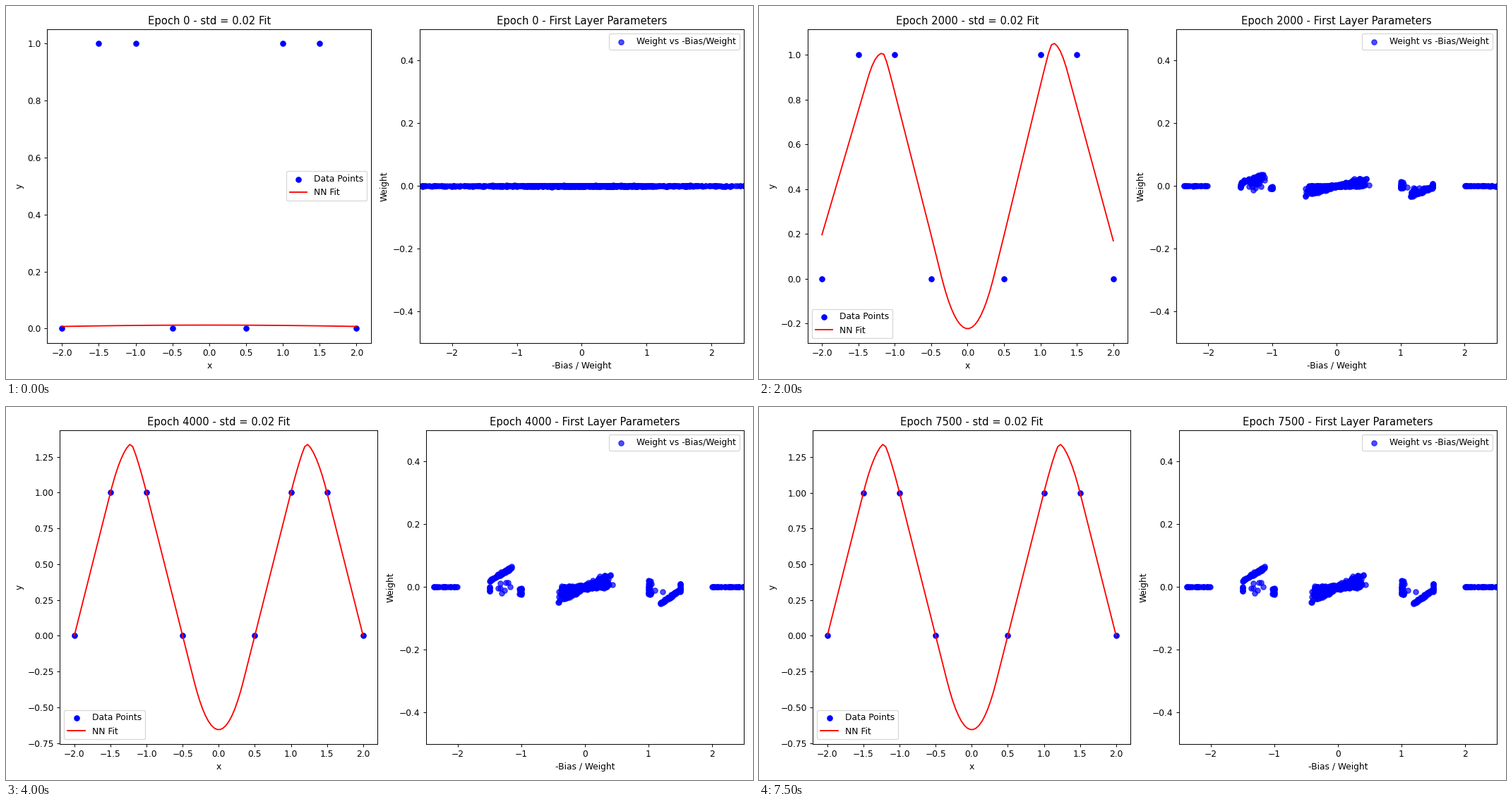
A matplotlib script for the animation above (8000 ms loop, 1058x529 px).

```python
import matplotlib.pyplot as plt
import numpy as np
from matplotlib.animation import FuncAnimation

FRAMES, INTERVAL, EPOCH_STEP = 16, 500, 500
DPI, LAYOUT_DPI = 1058 / 12, 100
NEURONS = 1000
DATA_X = np.array([-2, -1.5, -1, -0.5, 0.5, 1, 1.5, 2])
DATA_Y = ((np.abs(DATA_X) >= 1) & (np.abs(DATA_X) <= 1.5)).astype(float)
FIT_X = np.linspace(-2, 2, 100)


def lerp(a, b, t):
    return a + (b - a) * t


def progress(epoch):
    """Share of the bumpy shape learned so far: slow start, quick finish."""
    return (1 + np.exp((2077 - epoch) / 270)) ** -0.5


def half_curve(u, p):
    """Mirrored part of the fit, from a piecewise linear slope over u = |x|."""
    t = p * p
    inner = 2 * p
    outer = inner - 1.6 * p ** 3 * (1 - p)
    valley = 0.2725 + 0.32 * t - 0.25 * t * t
    peak = [lerp(1.03, 1.0, t), lerp(1.08, 1.17, t),
            lerp(1.13, 1.25, t), lerp(1.27, 1.5, t)]
    turn = np.array([0, 0.13 * t, lerp(0.51, 0.66, t), 1])
    knots = [0, valley, *peak]
    slopes = [0, inner, *lerp(inner, -outer, turn)]

    grid = np.linspace(0, 2, 2001)
    slope = np.interp(grid, knots, slopes)
    rise = np.append(0, np.cumsum((slope[1:] + slope[:-1]) / 2) * grid[1])
    end = 0.5 * (1 - p) - 0.45 * p * (1 - p) * (0.55 - p)
    return end + np.interp(u, grid, rise - rise[-1])


def fit_curve(epoch):
    p = progress(epoch)
    skew = np.interp(np.abs(FIT_X), [0.5, 1.2, 2], [0, 0.1, -0.06]) * np.sign(FIT_X)
    shape = half_curve(np.abs(FIT_X), p) + p * (1 - p) * skew
    untrained = 0.012 - 0.0012 * FIT_X ** 2
    return lerp(shape, untrained, np.exp(-epoch / 100))


class Neurons:
    """Kink positions and weights, drifting from random starts into clusters."""

    def __init__(self, seed=4):
        rng = np.random.default_rng(seed)
        self.x0 = rng.normal(size=NEURONS) / rng.normal(size=NEURONS)
        self.w0 = rng.normal(0, 0.0008, NEURONS)
        self.u = u = rng.random(NEURONS)
        noise = rng.normal(size=NEURONS)
        side, dist = np.sign(self.x0), np.abs(self.x0)

        along = (dist - 0.92) / 0.72
        centre, far = dist < 0.8, dist > 1.75
        lone = ~centre & ~far & (rng.random(NEURONS) < 0.04)
        inner, outer = along < 0, along > 1
        kinds = [centre, far, lone, inner, outer]
        band = ~np.any(kinds, axis=0)

        self.x1 = side * np.select(
            kinds,
            [dist * 0.46 * (1 + 0.12 * noise), 2 + (dist - 1.75) * 0.9,
             1.03 + 0.35 * u, 1 + 0.02 * np.abs(noise), 1.5],
            lerp(1.17 + 0.02 * side, 1.5, along))
        self.w1 = np.select(
            kinds,
            [self.x1 * 0.13 * u ** 1.5 + 0.003 * noise, 0 * u, 0.012 * noise,
             u * (0.034 + 0.012 * side) - 0.024, 0.03 * u - 0.015],
            -side * (0.058 - 0.005 * side - 0.044 * along) + 0.002 * noise)
        self.lean = np.select([band, centre],
                              [-0.055 * side * (1 - along), 0.3 * self.x1], 0)
        self.push = np.where(self.x1 < -2.38, -0.7, 0)

    def at(self, epoch):
        p = progress(epoch)
        gather = 1 - np.exp(-(epoch / 700) ** 2)
        loose = 1 - p * p
        x = lerp(self.x0, self.x1 + loose * self.lean, gather)
        w = lerp(self.w0, self.w1 * self.u ** (0.5 * loose), p * gather)
        return x + (1 - loose) * self.push, w


neurons = Neurons()
fig, (ax_fit, ax_params) = plt.subplots(1, 2, figsize=(12, 6), dpi=DPI)


def arrange():
    """Measure text at the layout resolution, then return to the stage's."""
    fig.set_dpi(LAYOUT_DPI)
    fig.tight_layout()
    fig.set_dpi(DPI)


def draw(frame):
    epoch = frame * EPOCH_STEP
    ax_fit.clear()
    ax_fit.scatter(DATA_X, DATA_Y, color="blue", label="Data Points")
    ax_fit.plot(FIT_X, fit_curve(epoch), color="red", label="NN Fit")
    ax_fit.set(title=f"Epoch {epoch} - std = 0.02 Fit", xlabel="x", ylabel="y")
    ax_fit.legend()

    ax_params.clear()
    ax_params.scatter(*neurons.at(epoch), color="blue", alpha=0.7,
                      label="Weight vs -Bias/Weight")
    ax_params.set(title=f"Epoch {epoch} - First Layer Parameters",
                  xlabel="-Bias / Weight", ylabel="Weight",
                  xlim=(-2.5, 2.5), ylim=(-0.5, 0.5))
    ax_params.legend(loc="upper right")
    arrange()


animation = FuncAnimation(fig, draw, frames=FRAMES, interval=INTERVAL,
                          repeat=True, repeat_delay=0)
plt.show()
```
